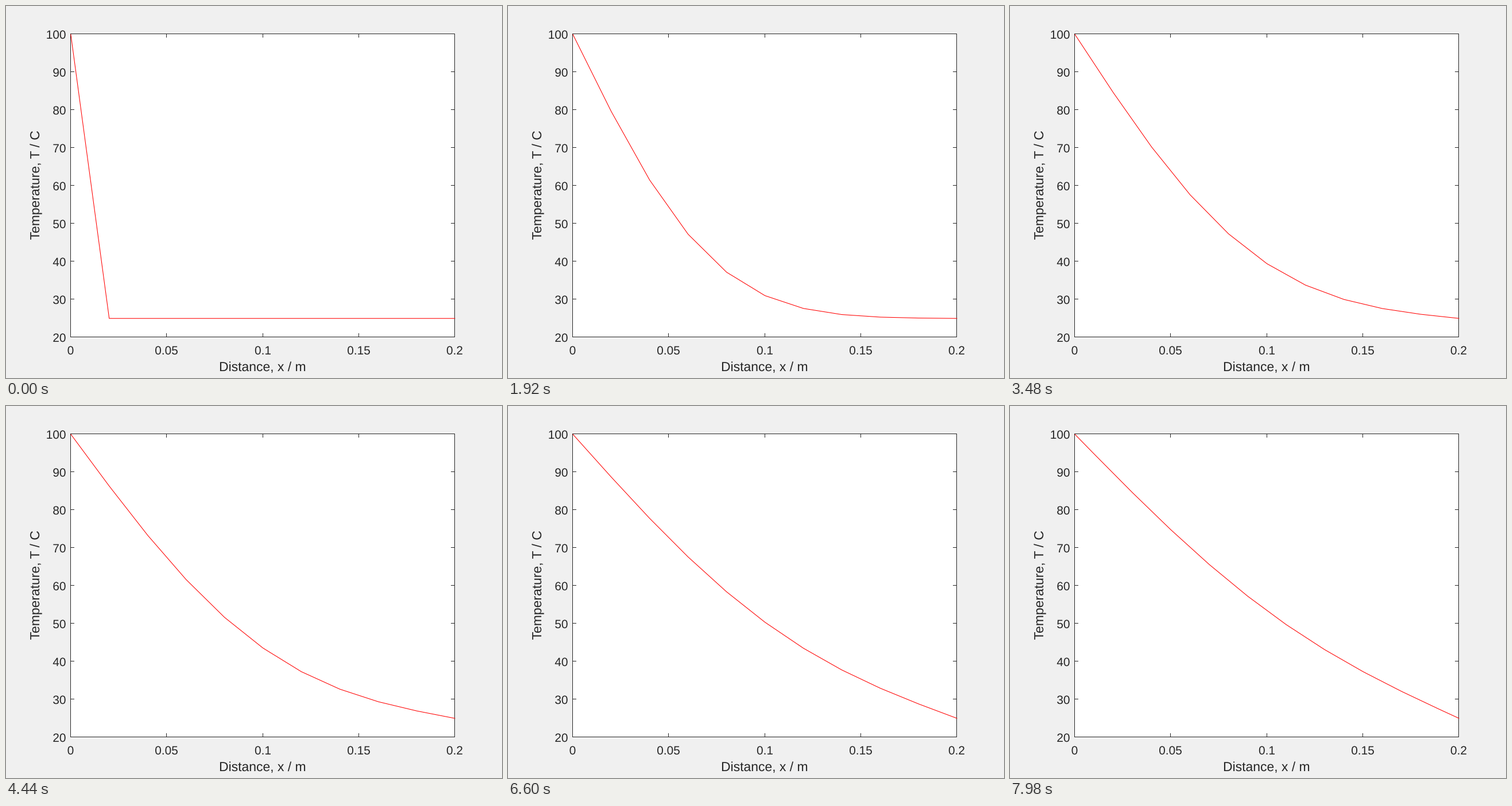
A matplotlib script that plays this animation: 864x648 px, repeating every 8 s.

```python
import numpy as np
import matplotlib.pyplot as plt
from matplotlib.animation import FuncAnimation
from matplotlib.collections import LineCollection
from matplotlib.patches import PathPatch, Rectangle
from matplotlib.textpath import TextPath
from matplotlib.transforms import Affine2D

plt.rcParams["font.family"] = "Liberation Sans"

W, H, DPI = 864, 648, 144
PT = 72 / DPI                      # points per pixel
X0, X1 = 0.13 * W, 0.905 * W       # plot box edges
Y0, Y1 = 0.89 * H, 0.075 * H
INK = "#262626"
TICK_PX, LABEL_PX = 20.83, 22.92
TICK_LEN = 6

LOOP_MS, INTERVAL, HOLD = 8000, 20, 3
FRAMES = LOOP_MS // INTERVAL
NODES = 21


def px(x):
    return X0 + (X1 - X0) * x / 0.2


def py(temp):
    return Y0 + (Y1 - Y0) * (temp - 20) / 80


def crisp(v):
    """Centre of the pixel that holds v."""
    return np.floor(v) + 0.5


LEFT, RIGHT, TOP, BOTTOM = map(crisp, (X0, X1, Y1, Y0))


def heat_states(count):
    """Explicit heat conduction with fixed ends and a Fourier number of 0.5."""
    temp = np.full(NODES, 25.0)
    temp[0] = 100
    states = []
    for _ in range(count):
        temp[1:-1] = (temp[:-2] + temp[2:]) / 2
        states.append(temp.copy())
    return states


fig = plt.figure(figsize=(W / DPI, H / DPI), dpi=DPI, facecolor="#f0f0f0")
ax = fig.add_axes([0, 0, 1, 1])
ax.set_xlim(0, W)
ax.set_ylim(H, 0)
ax.axis("off")


def write(x, y, text, size, angle=0, centre=False):
    """Place text with its baseline start, or its middle, at (x, y)."""
    path = TextPath((0, 0), text, size=size)
    box = path.get_extents()
    shift = -(box.x0 + box.x1) / 2 if centre else 0
    place = Affine2D().translate(shift, 0).rotate_deg(angle).scale(1, -1).translate(x, y)
    ax.add_patch(PathPatch(place.transform_path(path), fc=INK, lw=0, snap=False))


def number_width(text):
    return TICK_PX * sum(0.278 if c == "." else 0.556 for c in text)


ax.add_patch(Rectangle((LEFT, TOP), RIGHT - LEFT, BOTTOM - TOP, fc="white", ec="none"))

lines = [[(LEFT, TOP), (RIGHT, TOP)], [(LEFT, BOTTOM), (RIGHT, BOTTOM)],
         [(LEFT, TOP), (LEFT, BOTTOM)], [(RIGHT, TOP), (RIGHT, BOTTOM)]]

for i in range(5):
    value = i * 0.05
    label = f"{value:.2g}"
    x = crisp(px(value))
    write(x - number_width(label) / 2, 607, label, TICK_PX)
    if 0 < i < 4:
        lines += [[(x, TOP), (x, TOP + TICK_LEN)], [(x, BOTTOM), (x, BOTTOM - TICK_LEN)]]

for value in range(20, 101, 10):
    label = str(value)
    y = crisp(py(value))
    write(104.5 - number_width(label), y + 8.5, label, TICK_PX)
    if 20 < value < 100:
        lines += [[(LEFT, y), (LEFT + TICK_LEN, y)], [(RIGHT, y), (RIGHT - TICK_LEN, y)]]

ax.add_collection(LineCollection(lines, colors=INK, linewidths=PT, capstyle="projecting",
                                 snap=False, zorder=2), autolim=False)

write((LEFT + RIGHT) / 2, 636, "Distance, x / m", LABEL_PX, centre=True)
write(58, (TOP + BOTTOM) / 2, "Temperature, T / C", LABEL_PX, angle=90, centre=True)

states = heat_states((FRAMES - 1) // HOLD + 1)
xs = px(np.linspace(0, 0.2, NODES)) + 0.5
curve, = ax.plot(xs, py(states[0]) + 0.5, color="red", lw=1.05 * PT, snap=False,
                 solid_capstyle="butt", zorder=3)


def update(frame):
    curve.set_ydata(py(states[frame // HOLD]) + 0.5)
    return curve,


anim = FuncAnimation(fig, update, frames=FRAMES, interval=INTERVAL,
                     init_func=lambda: update(0), repeat=True, repeat_delay=0)
plt.show()
```
